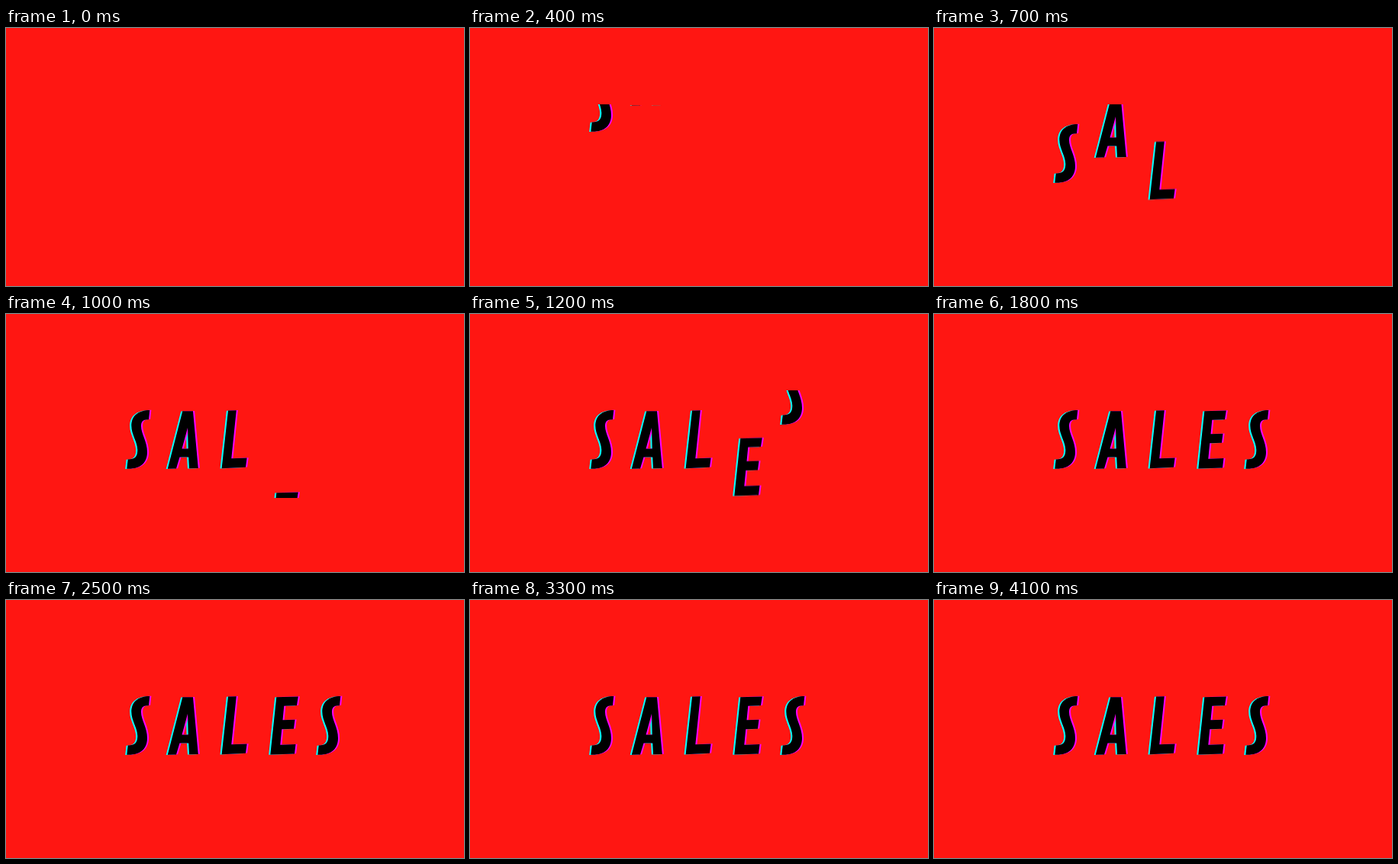
An HTML page for the animation above (5 s loop, 600x338 px).

```html
<!DOCTYPE html>
<html lang="en">
<head>
<meta charset="utf-8">
<title>Sales</title>
<style>
  html, body { margin: 0; width: 100%; height: 100%; overflow: hidden; background: #ff1612; }
  svg { display: block; width: 100vw; height: 100vh; }
  .letter { animation: 5s -1ms infinite step-end; }
  .s1 { animation-name: s1; }
  .a { animation-name: a; }
  .l { animation-name: l; }
  .e { animation-name: e; }
  .s2 { animation-name: s2; }

  /* 2% is one 100 ms tick */
  @keyframes s1 {
    0% { transform: translateY(-115px); }
    4% { transform: translateY(-101px); animation-timing-function: steps(2); }
    8% { transform: translateY(-67px); animation-timing-function: steps(3); }
    14%, 100% { transform: none; }
  }
  @keyframes a {
    0% { transform: translateY(-115px); }
    8% { transform: translateY(-101.5px); animation-timing-function: steps(3); }
    14% { transform: translateY(-33px); }
    16% { transform: translateY(-10px); }
    18%, 100% { transform: none; }
  }
  @keyframes l {
    0% { transform: translateY(130px); }
    10% { transform: translateY(88px); animation-timing-function: steps(2); }
    14% { transform: translateY(22.5px); }
    16%, 100% { transform: none; }
  }
  @keyframes e {
    0% { transform: translateY(130px); }
    20% { transform: translateY(107px); animation-timing-function: steps(3); }
    26%, 100% { transform: translateY(0); }
  }
  @keyframes s2 {
    0% { transform: translateY(-115px); }
    22% { transform: translateY(-81px); animation-timing-function: steps(3); }
    28% { transform: translateY(-12px); }
    30%, 100% { transform: none; }
  }
</style>
</head>
<body>
<svg viewBox="0 0 600 338" role="img" aria-label="SALES">
  <defs>
    <clipPath id="window"><rect x="140" y="100.5" width="320" height="140"/></clipPath>
    <path id="S" d="M188.300 126C173 126 164.300 133.500 164.300 146.500C164.300 158 172 167 172.300 178C172.400 187 168.500 190.500 159.700 190.500L158.300 202.700C176 203.500 185 195 185 181C185 167 177 157 177 147C177 141 179 138 187 138.200Z"/>
    <path id="A" d="M231.300 127.200H245L251.800 202L240 202.300L239.200 187.500H227.500L223 202.500L211.800 202.700ZM238 149L230.500 176.500H238.700Z"/>
    <path id="L" d="M291 126.500L301.800 126.200L295.300 189.300L315.600 188.500L314 200.800L282.600 202.300Z"/>
    <path id="E" d="M354.300 127.200L382.800 126.500L381 138.200L364.300 138.800L362.500 157.300L378.500 156.800L377 168.800L361.300 169.300L359.300 189.800L379.500 189L378 201.500L346.300 202.500Z"/>
  </defs>
  <g id="word" clip-path="url(#window)"></g>
</svg>
<script>
  const word = document.getElementById('word');
  const layers = [['#0ff', -2.1, .3], ['#f0f', 2.1, -.2], ['#000', 0, 0]];

  function addLetter(name, glyph, shift = 0) {
    const uses = layers.map(([color, x, y]) =>
      `<use href="#${glyph}" x="${x + shift}" y="${y}" fill="${color}"/>`);
    word.innerHTML += `<g class="letter ${name}">${uses.join('')}</g>`;
  }

  addLetter('s1', 'S');
  addLetter('a', 'A');
  addLetter('l', 'L');
  addLetter('e', 'E');
  addLetter('s2', 'S', 250);
</script>
</body>
</html>
```
